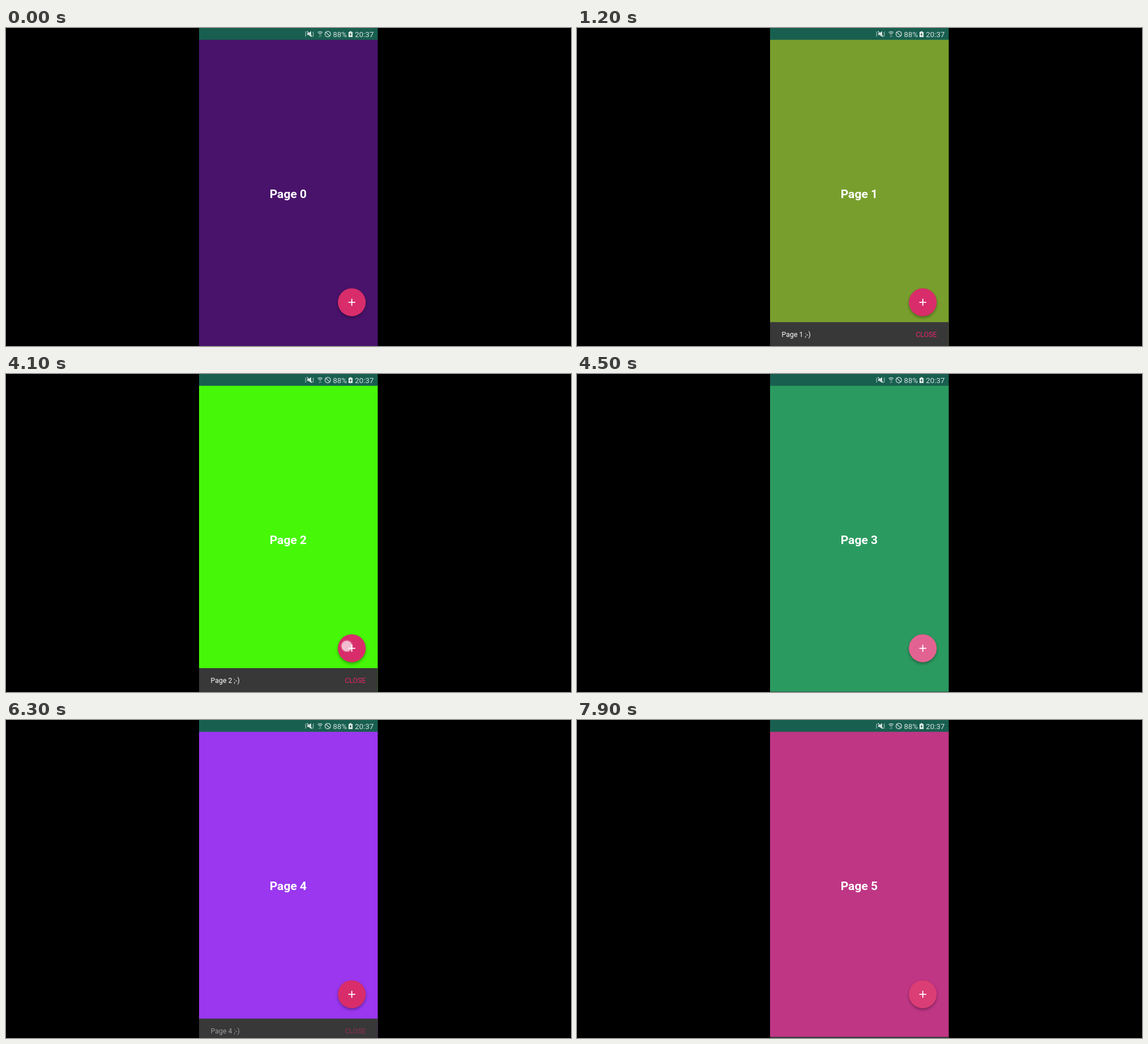
An HTML page for the animation above (8 s loop, 998 by 561 pixels).

```html
<!DOCTYPE html>
<html lang="en">
<head>
<meta charset="utf-8">
<title>Pages</title>
<style>
  html, body { margin: 0; width: 100%; height: 100%; overflow: hidden; background: #000; }
  svg { display: block; width: 100%; height: 100%; }
  text { font-family: Roboto, sans-serif; fill: #fff; }
  .title { font-size: 21.07px; font-weight: 700; text-anchor: middle; }
  .snack { font-size: 12.3px; }
  .status { font-size: 13.3px; fill: #d6e2de; }
</style>
</head>
<body>
<svg viewBox="0 0 998 561">
  <defs>
    <clipPath id="screen"><rect x="341" y="0" width="315.6" height="561"/></clipPath>
    <clipPath id="disc"><circle cx="610.8" cy="483.8" r="24.6"/></clipPath>
    <filter id="soft" x="-50%" y="-50%" width="200%" height="200%"><feGaussianBlur stdDeviation="2.6"/></filter>
  </defs>
  <rect width="998" height="561" fill="#000"/>
  <g clip-path="url(#screen)">
    <g id="pageA"><rect x="341" y="20" width="316" height="541"/><text class="title" x="498.4" y="299.6"></text></g>
    <g id="pageB"><rect x="341" y="20" width="316" height="541"/><text class="title" x="498.4" y="299.6"></text></g>

    <g id="snack">
      <rect x="341" y="518.9" width="316" height="43" fill="#383838"/>
      <g id="label" class="snack">
        <text id="message" x="361.6" y="545"></text>
        <text x="635.6" y="545" text-anchor="end" style="fill:#e6266e">CLOSE</text>
      </g>
    </g>

    <circle id="shadow" cx="610.8" cy="486.8" r="24.6" fill="#000" filter="url(#soft)"/>
    <circle cx="610.8" cy="483.8" r="24.6" fill="#d82d6a"/>
    <g clip-path="url(#disc)"><circle id="ripple" fill="#fff"/></g>
    <path d="M604.7 483.8h12.3M610.8 477.7v12.3" stroke="#fff" stroke-width="1.8"/>
    <g id="touch" fill="#fff">
      <circle cx="602" cy="480" r="11" opacity=".2"/>
      <circle cx="602" cy="480" r="9.3" opacity=".6"/>
    </g>

    <rect x="341" y="0" width="316" height="20.8" fill="#185f50"/>
    <g stroke="#d6e2de" fill="none" stroke-width="1">
      <path d="M528.6 6.5l1.3 2-1.3 2 1.3 2-1.3 2.5M543.4 6.5l-1.3 2 1.3 2-1.3 2 1.3 2.5"/>
      <path d="M532 9h2.4l4.6-3.4v10l-4.6-3.4H532z" fill="#d6e2de" stroke="none"/>
      <path d="M531.5 5.5l9.5 10" stroke-width="1.2"/>
      <path d="M550.6 8q4.2-3.6 8.4 0M552.1 10q2.7-2.3 5.4 0" stroke-width="1.1"/>
      <path d="M553.4 11.2h2.8l-1.4 1.6zM552.6 15.4l1-1.4 1 1.4zM555.2 13.8h2l-1 1.5z" fill="#d6e2de" stroke="none"/>
      <circle cx="568.4" cy="10.7" r="4.9" stroke-width="1.2"/>
      <path d="M565 7.3l6.8 6.8" stroke-width="1.2"/>
      <path d="M605 7h2v-1.3h3.2V7h2v9H605z" fill="#e4ece9" stroke="none"/>
      <path d="M609.6 7.6l-3 4.3h1.8l-.8 3.3 3-4.4h-1.8z" fill="#185f50" stroke="none"/>
    </g>
    <text class="status" x="577.6" y="15.7">88%</text>
    <text class="status" x="616.3" y="15.7">20:37</text>
  </g>
</svg>
<script>
const LOOP = 8000, STEP = 100, WIDTH = 315.6, SNACK_H = 42.1;
const COLORS = ['#49136b', '#789f2d', '#46f708', '#2b9a60', '#9a37ef', '#bf3685'];
// Each tap: finger down, finger up
const TAPS = [[400, 600], [2300, 2481], [4100, 4290], [5800, 5905], [7300, 7605]];

const $ = id => document.getElementById(id);
const clamp = v => Math.min(1, Math.max(0, v));
const span = (t, start, length) => clamp((t - start) / length);
const quintOut = p => 1 - (1 - p) ** 5;

// cubic-bezier(.4, 0, .2, 1)
function standard(x) {
  let lo = 0, hi = 1;
  for (let i = 0; i < 20; i++) {
    const s = (lo + hi) / 2, r = 1 - s;
    if (1.2 * s * r * r + .6 * s * s * r + s ** 3 < x) lo = s; else hi = s;
  }
  return lo * lo * (3 - 2 * lo);
}

function setPage(id, n, x) {
  const page = $(id);
  page.setAttribute('transform', `translate(${x.toFixed(2)} 0)`);
  page.firstChild.setAttribute('fill', COLORS[n]);
  page.lastChild.textContent = 'Page ' + n;
}

function setSnack(n, shown, alpha) {
  $('snack').setAttribute('transform', `translate(0 ${((1 - shown) * SNACK_H).toFixed(2)})`);
  $('snack').setAttribute('visibility', n && shown > 0 ? 'visible' : 'hidden');
  $('label').setAttribute('opacity', alpha);
  $('message').textContent = `Page ${n} ;-)`;
}

function render(t) {
  const done = TAPS.filter(tap => tap[0] <= t).length;
  const [down, up] = done ? TAPS[done - 1] : [Infinity, Infinity];
  const since = done ? t - up : -1;
  const from = Math.max(0, done - 1);

  const offset = done ? WIDTH * (1 - quintOut(span(since, 37, 200))) : WIDTH;
  setPage('pageA', from, offset - WIDTH);
  setPage('pageB', done || 1, offset);

  const show = done > 1 ? 262 : 0;
  if (since < show) {
    setSnack(from, 1 - standard(span(since, 0, 250)), 1 - standard(span(since, 0, 180)));
  } else {
    setSnack(done, standard(span(since, show, 250)), standard(span(since, show + 70, 180)));
  }

  const held = done && t < up;
  $('touch').setAttribute('visibility', held ? 'visible' : 'hidden');

  const grow = done ? quintOut(span(t, down, 300)) : 0;
  const fade = done ? 1 - span(since, 150, 180) : 0;
  const ripple = $('ripple');
  ripple.setAttribute('cx', 602 + 8.8 * grow);
  ripple.setAttribute('cy', 480 + 3.8 * grow);
  ripple.setAttribute('r', 26 * grow);
  ripple.setAttribute('opacity', .39 * fade);

  const lift = done ? span(t, down, 100) * (1 - span(since, 0, 100)) : 0;
  $('shadow').setAttribute('cy', 486.4 + 2 * lift);
  $('shadow').setAttribute('opacity', .34 + .06 * lift);
}

const begin = performance.now();
function tick() {
  const t = (performance.now() - begin) % LOOP;
  render(Math.floor(t / STEP) * STEP);
  requestAnimationFrame(tick);
}
tick();
</script>
</body>
</html>
```
